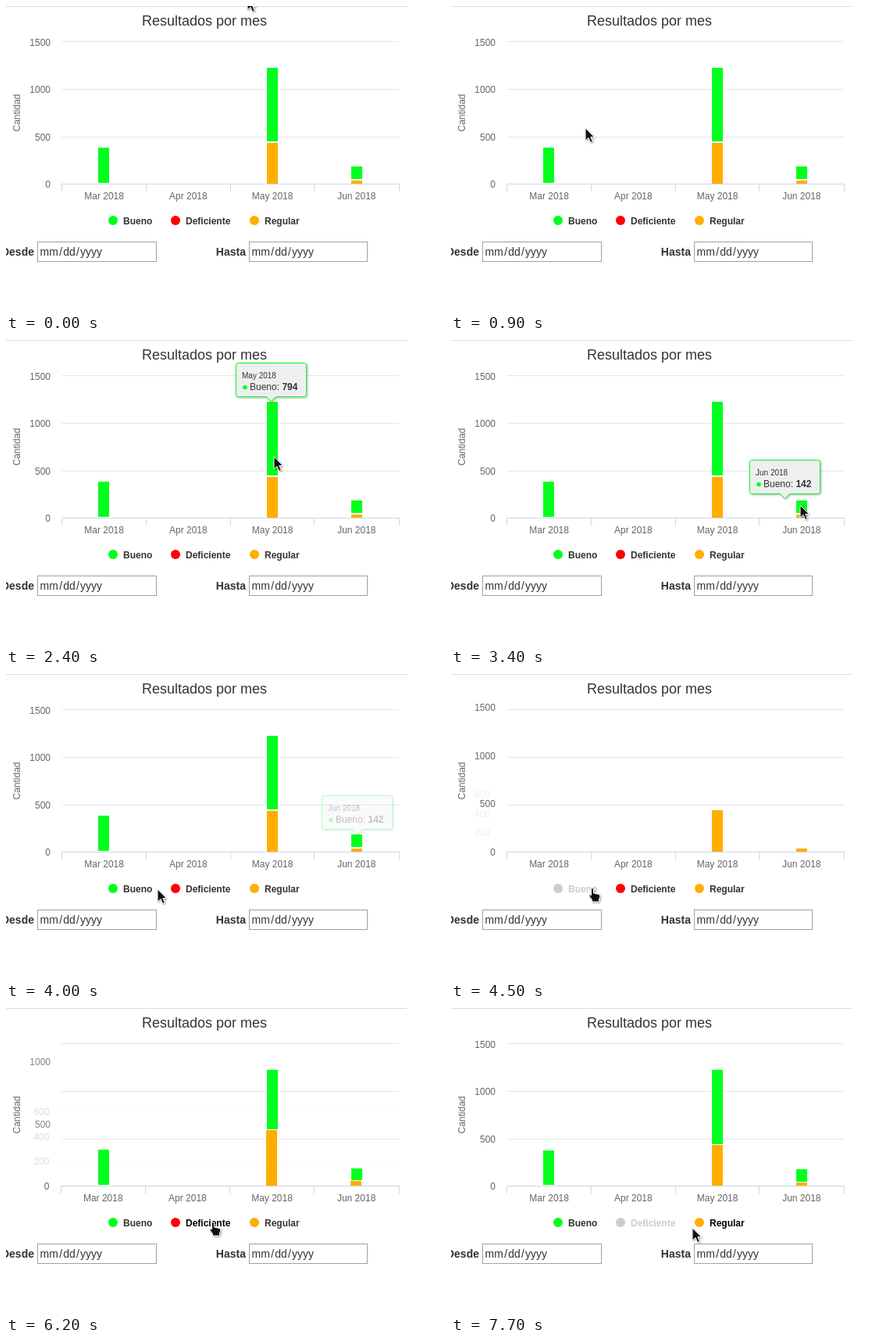
An HTML page that plays this animation: 562 by 391 pixels, repeating every 8000 ms.

```html
<!DOCTYPE html>
<html lang="es">
<head>
<meta charset="utf-8">
<title>Resultados por mes</title>
<style>
  html, body { margin: 0; width: 100%; height: 100%; overflow: hidden; background: #fff; }
  svg { display: block; width: 562px; height: 391px; font: 12px "Liberation Sans", Arial, sans-serif; fill: #333; }
  .bold { font-weight: bold; }
  .axis { fill: #666; }
  .grid { stroke: #e6e6e6; }
  .ticks { stroke: #ccd6eb; fill: none; }
  .field { font-size: 14px; }
  .field rect { fill: #fff; stroke: #a0a0a0; }
  .bar { stroke: #fff; }
  .cursor { filter: drop-shadow(1px 1px 1px rgba(0, 0, 0, .4)); }
  .cursor path { fill: #111; stroke: #fff; stroke-linejoin: round; }
  .tip { filter: drop-shadow(1px 1px 1.5px rgba(0, 0, 0, .35)); }
</style>
</head>
<body>
<svg viewBox="0 0 562 391">
  <path d="M0 .5H513" stroke="#dcdcdc"/>
  <text x="254" y="25" text-anchor="middle" font-size="18">Resultados por mes</text>
  <text class="axis" transform="translate(18 136.5) rotate(-90)" text-anchor="middle">Cantidad</text>
  <g id="chart"></g>
  <g class="field">
    <text class="bold" x="36" y="319" text-anchor="end">Desde</text>
    <rect x="40.5" y="301.5" width="152" height="25"/>
    <text x="43.6" y="319">mm<tspan dx="1.2">/</tspan><tspan dx="1.2">dd</tspan><tspan dx="1.2">/</tspan><tspan dx="1.2">yyyy</tspan></text>
    <text class="bold" x="307" y="319" text-anchor="end">Hasta</text>
    <rect x="311.5" y="301.5" width="151" height="25"/>
    <text x="314.6" y="319">mm<tspan dx="1.2">/</tspan><tspan dx="1.2">dd</tspan><tspan dx="1.2">/</tspan><tspan dx="1.2">yyyy</tspan></text>
  </g>
  <g id="overlay"></g>
</svg>
<script>
const LOOP = 8000, STEP = 100;
const GREEN = '#00ff1e', RED = '#ff0000', ORANGE = '#ffae00', OFF = '#cccccc';
const BASE = 227.5, HEIGHT = 181, RIGHT = 502.7;
const MONTHS = ['Mar 2018', 'Apr 2018', 'May 2018', 'Jun 2018'];

// Stepped keys: [time, ...values]
const ZOOM = [[0, 0], [4500, .015], [4700, .44], [4800, .77], [4900, .95], [5000, 1],
  [5900, .98], [6100, .65], [6200, .21], [6400, 0]];
const SETTLE = [[0, 0], [6700, .3], [6800, .7], [7000, 1]];
// [time, x, y, opacity, month, value, border]
const TIPS = [
  [0, 0, 0, 0],
  [1200, 81.5, 131.5, 1, 0, 378, '#999'],
  [2000, 156, 80, 1, 2, 794, GREEN],
  [2100, 230, 40, 1, 2, 794, GREEN],
  [2200, 273, 31, 1, 2, 794, GREEN],
  [2300, 294.5, 29.5, 1, 2, 794, GREEN],
  [3300, 330.5, 115.5, 1, 3, 142, GREEN],
  [3400, 382.5, 153.5, 1, 3, 142, GREEN],
  [3600, 404.5, 155.5, 1, 3, 142, GREEN],
  [3900, 404.5, 155.5, .7, 3, 142, GREEN],
  [4000, 404.5, 155.5, .3, 3, 142, GREEN],
  [4100, 0, 0, 0]
];
// Pointer moves: [first step, step count, x, y, ease power]
const MOVES = [[100, 7, 184, 146, 1], [900, 5, 123, 196, 1], [1600, 1, 213, 191, 1],
  [1700, 8, 343, 149, 3], [3100, 4, 447, 211, 1], [3600, 2, 232, 282, 1],
  [3900, 4, 181, 273, 2], [6100, 2, 265, 273, 1], [6400, 1, 268, 273, 1], [7500, 3, 309, 281, 1]];

const chart = document.getElementById('chart');
const overlay = document.getElementById('overlay');
const mix = (a, b, p) => a + (b - a) * p;
const within = (t, a, b) => t >= a && t < b;
const keyAt = (keys, t) => keys.filter(k => k[0] <= t).pop();

const text = (x, y, str, attrs = '') => `<text x="${x}" y="${y}" ${attrs}>${str}</text>`;
const bar = (x, top, bottom, color) =>
  `<rect class="bar" x="${x - .5}" y="${top - .5}" width="15" height="${bottom - top + 1}" fill="${color}"/>`;

function axes(t, zoom) {
  const back = t >= 5900, left = 71.7 - 7 * zoom, slot = (RIGHT - left) / 4;
  const yOf = v => BASE - v * mix(HEIGHT / 1500, HEIGHT / 600, zoom);
  const label = (v, right, opacity) => text(right, Math.round(yOf(v) + 4.5), v,
    `class="axis" text-anchor="end" opacity="${opacity}"`);
  const sliding = 57 - 7 * zoom;
  let grid = '', labels = label(0, sliding, 1);
  for (const y of [45.5, 106.5, 167.5]) grid += `<path class="grid" d="M${left} ${y}H503"/>`;
  if (zoom < 1) {
    for (const v of [500, 1000, 1500]) labels += label(v, back ? 57 : sliding, Math.max(1 - zoom, .1));
  }
  if (zoom > 0) {
    const opacity = Math.max(zoom, .1);
    for (const v of [200, 400, 600]) {
      labels += label(v, back ? sliding : 50, opacity);
      if (back) grid += `<path class="grid" d="M${left} ${Math.round(yOf(v)) + .5}H503" opacity="${opacity * .8}"/>`;
    }
  }
  let ticks = `M${left} 227.5H503`;
  for (let i = 0; i < 5; i++) ticks += `M${i < 4 ? Math.floor(left + slot * i) + .5 : 503.5} 227V237`;
  MONTHS.forEach((m, i) => labels += text(left + slot * (i + .5), 247, m, 'class="axis" text-anchor="middle"'));
  return { grid, front: `<path class="ticks" d="${ticks}"/>` + labels, left, slot };
}

function bars(t, zoom, { left, slot }) {
  const d = keyAt(SETTLE, t)[1];
  // Columns run slightly ahead of the axis
  const rise = Math.min(1, zoom * 1.15);
  let out = '';
  if (!within(t, 4500, 5900)) {
    out += bar(118, 181 + d, 226, GREEN) + bar(334, 79, 173 + d, GREEN) + bar(442, 205 + d, 221 + d, GREEN);
  }
  for (const [i, low, high] of [[2, 175, 97], [3, 223, 216]]) {
    out += bar(Math.round(left + slot * (i + .5) - 7.2), Math.round(mix(low, high, rise)), 227, ORANGE);
  }
  return out;
}

function legend(t) {
  const item = (x, name, color, hidden, hover) =>
    `<circle cx="${x}" cy="274" r="6" fill="${hidden ? OFF : color}"/>` +
    text(x + 13, 279, name, `class="bold" fill="${hidden ? OFF : hover ? '#000' : '#333'}"`);
  return item(137, 'Bueno', GREEN, within(t, 4500, 5900), within(t, 4100, 4500)) +
    item(217, 'Deficiente', RED, t >= 6600, t >= 6200) +
    item(318, 'Regular', ORANGE, false, t >= 7600);
}

function tooltip(t) {
  const [, x, y, opacity, month, value, border] = keyAt(TIPS, t);
  if (!opacity) return '';
  return `<g class="tip" transform="translate(${x} ${y})" opacity="${opacity}">
    <path d="M3 0H87Q90 0 90 3V40Q90 43 87 43H51L45 49L39 43H3Q0 43 0 40V3Q0 0 3 0Z"
      fill="#f7f7f7" fill-opacity=".9" stroke="${border}"/>
    <circle cx="11.5" cy="31" r="2.8" fill="${GREEN}"/>
    ${text(7.5, 19.5, MONTHS[month], 'font-size="10"')}
    ${text(17.5, 34.5, `Bueno: <tspan class="bold">${value}</tspan>`)}</g>`;
}

function cursor(t) {
  let x = 309, y = -11;
  for (const [start, count, toX, toY, power] of MOVES) {
    if (t < start) break;
    const k = Math.min(1, ((t - start) / STEP + 1) / count);
    const p = 1 - (1 - k) ** power;
    x = mix(x, toX, p);
    y = mix(y, toY, p);
  }
  const arrow = 'M0 0V16L4 12.5L6.6 18.5L9.3 17.3L6.8 11.5H11.5Z';
  const hand = 'M-1.5 1.5Q0-.5 1.5 1.5V7L8 8.5Q10 9 9.8 11.5L8.5 15V18H-.5V15.5L-4 11Q-4.5 8.5-2.5 9L-1.5 10Z';
  return `<g class="cursor" transform="translate(${Math.round(x)} ${Math.round(y)})">
    <path d="${within(t, 4100, 7500) ? hand : arrow}"/></g>`;
}

let shown = -1;
function frame(now) {
  const t = Math.floor(now % LOOP / STEP) * STEP;
  if (t !== shown) {
    shown = t;
    const zoom = keyAt(ZOOM, t)[1], axis = axes(t, zoom);
    chart.innerHTML = axis.grid + bars(t, zoom, axis) + axis.front + legend(t);
    overlay.innerHTML = tooltip(t) + cursor(t);
  }
  requestAnimationFrame(frame);
}
const begin = performance.now();
requestAnimationFrame(now => frame(Math.max(0, now - begin)));
</script>
</body>
</html>
```
